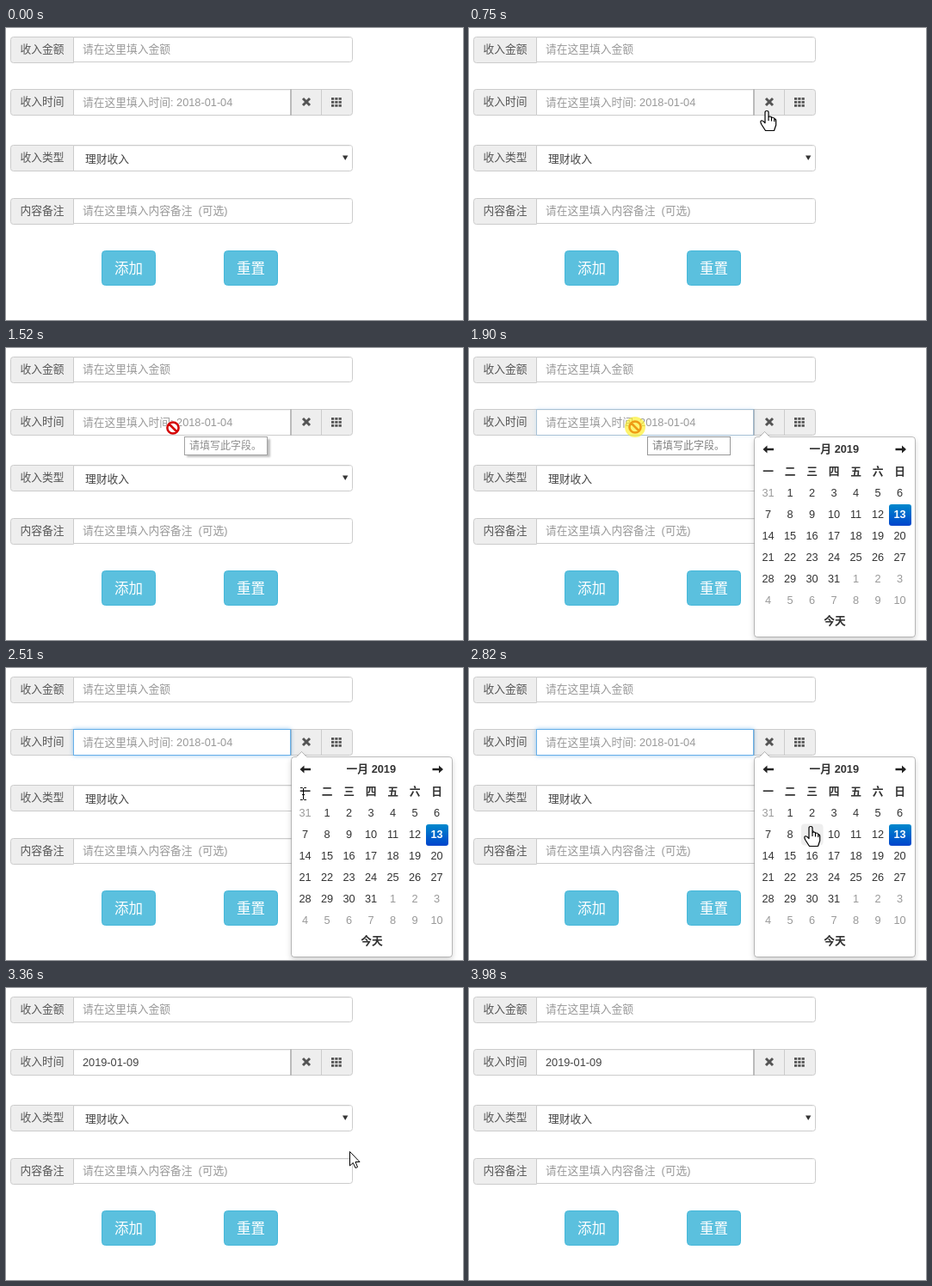
Recreate the animation shown at these times as an HTML page. Size 531 by 340 pixels, loop 4.53 s.

```html
<!DOCTYPE html>
<html lang="zh-CN">
<head>
<meta charset="utf-8">
<style>
  html, body { margin: 0; width: 100%; height: 100%; overflow: hidden; background: #fff; }
  svg { display: block; width: 531px; height: 340px; }
  text { font: 12.75px "Liberation Sans", "Noto Sans CJK SC", "Noto Sans CJK", sans-serif; white-space: pre; }
  .b { font-weight: bold; }
  .mid { text-anchor: middle; }
  #glow { filter: drop-shadow(0 0 2.5px rgba(102, 175, 233, .7)); }
  #panel { filter: drop-shadow(0 3px 3px rgba(0, 0, 0, .18)); }
  #shade { filter: blur(1px); }
</style>
</head>
<body>
<svg viewBox="0 0 531 340">
  <defs>
    <linearGradient id="blue" x2="0" y2="1">
      <stop stop-color="#08c"/><stop offset="1" stop-color="#04c"/>
    </linearGradient>
  </defs>
  <g id="form"></g>
  <rect id="glow" x="78.5" y="71.5" width="252" height="30" fill="#fff" stroke="#66afe9"/>
  <g id="words"></g>
  <g id="tip">
    <rect id="shade" x="210" y="106" width="97" height="21" fill="#888" opacity=".8"/>
    <rect x="207.5" y="103.5" width="96" height="21" fill="#fff" stroke="#767676"/>
    <text x="213" y="118" fill="#575757" style="font-size:12px">请填写此字段。</text>
  </g>
  <g id="calendar">
    <path id="panel" fill="#fff" stroke="#000" stroke-opacity=".25"
      d="M335 103.500h2.500l6-6 6 6H515q3.500 0 3.500 3.500V333q0 3.500-3.500 3.500H335q-3.500 0-3.500-3.500V107q0-3.500 3.500-3.500z"/>
    <rect id="hover" width="25.5" height="25" rx="4" fill="#eee"/>
    <rect x="488" y="182" width="26" height="25" rx="3" fill="url(#blue)"/>
    <path d="M341.500 118l5-4.500v3.200h7.500v2.600h-7.500v3.200zM508 118l-5-4.500v3.200h-7.500v2.600h7.500v3.200z" fill="#222"/>
    <g id="days"></g>
  </g>
  <g id="cursor" stroke="#000" fill="#fff">
    <path id="arrow" d="M.5.5V17L4.300 13.500 7 19.500 9.500 18.500 7 12.500H12z"/>
    <g id="ban">
      <circle r="8" stroke="none"/>
      <path d="M6.600 0A6.600 6.600 0 1 1-6.600 0 6.600 6.600 0 1 1 6.600 0M-4.500-4.500 4.500 4.500" stroke="#d40000" stroke-width="2.500"/>
    </g>
    <path id="beam" d="M-3-6.500h2.500l1 1 1-1H4M.5-6V7M-3 7.500h2.500l1-1 1 1H4M-1 1.500h3" fill="none"/>
    <path id="hand" stroke-width="1.200" stroke-linejoin="round"
      d="M-1 2.500Q-1 .5 1 .5T3 2.500V8Q3 7 4.800 7T6.500 9Q6.500 8 8 8T9.800 10Q11.700 9.500 11.700 12V17L9.500 23.500H-.5L-5 16.500Q-7 13-5.500 12T-1 14.500zM3 8v4M6.500 9v3.500M9.800 10v3"/>
  </g>
  <circle id="click" r="12" fill="#fcee20" opacity=".65"/>
</svg>
<script>
const LOOP = 4530;
const $ = id => document.getElementById(id);
const show = (id, on) => $(id).setAttribute("opacity", +on);
const text = (x, y, s, fill, cls = "", id = "") =>
  `<text x="${x}" y="${y}" fill="${fill}" class="${cls}" id="${id}">${s}</text>`;

function row(y, h = 30, right = 402.5, r = 3) {
  return `<path d="M78.500 ${y}h-70q-3 0-3 3v24q0 3 3 3h70z" fill="#eee" stroke="#ccc"/>
    <path d="M78.500 ${y}H${right - r}q${r} 0 ${r} ${r}v${h - 2 * r}q0 ${r}-${r} ${r}H78.500z" fill="#fff" stroke="#ccc"/>
    <path d="M79 ${y + 1}H${right - 1}" stroke="#f1f1f1"/>`;
}

function button(x, label) {
  return `<rect x="${x + .5}" y="259.500" width="62" height="40" rx="4" fill="#5bc0de" stroke="#46b8da"/>
    <text x="${x + 31.5}" y="285.500" class="mid" fill="#fff" style="font-size:16.500px">${label}</text>`;
}

let grid = "";
for (let i = 0; i < 9; i++)
  grid += `<rect x="${378 + i % 3 * 4.3}" y="${81 + (i / 3 | 0) * 4}" width="3.200" height="2.800" fill="#555"/>`;

$("form").innerHTML =
  `<rect x="320.500" y="71.500" width="82" height="30" rx="3" fill="#eee" stroke="#ccc"/>` +
  row(10.5, 29) + row(71.5, 30, 330.5, 0) + row(136.5) + row(198.5, 29) +
  `<path d="M331 71v31" stroke="#bbb" stroke-width="2"/><path d="M366.500 72v29" stroke="#ccc"/>
   <path d="M345 82l8 8m0-8l-8 8" stroke="#555" stroke-width="3"/>
   <path d="M391 148.500h6.400l-3.200 5.500z" fill="#333"/>` +
  grid + button(111, "添加") + button(253, "重置");

$("words").innerHTML =
  [["收入金额", 28.6], ["收入时间", 89.6], ["收入类型", 154.6], ["内容备注", 216.8]]
    .map(([s, y]) => text(16.5, y, s, "#555")).join("") +
  text(89, 28.6, "请在这里填入金额", "#999") +
  text(89, 90.7, "请在这里填入时间: 2018-01-04", "#999", "", "hint") +
  text(89, 90.7, "2019-01-09", "#444", "", "value") +
  text(92, 156.6, "理财收入", "#444") +
  text(89, 216.8, "请在这里填入内容备注  (可选)", "#999");

const colX = c => 347.5 + 25.5 * c;
let days = text(424.3, 122.4, "一月 2019", "#333", "b mid") + text(425, 322.4, "今天", "#333", "b mid");
[..."一二三四五六日"].forEach((s, c) => days += text(colX(c), 147.8, s, "#333", "b mid"));
for (let i = 0; i < 42; i++) {
  const day = (i + 30) % 31 + 1, today = i === 13;
  const fill = today ? "#fff" : i < 1 || i > 31 ? "#999" : "#333";
  days += text(colX(i % 7), 172.5 + 25 * (i / 7 | 0), day, fill, today ? "b mid" : "mid");
}
$("days").innerHTML = days;

// Pointer moves: first and last step time, steps, start, end, progress curve
const out = p => 1 - (1 - p) ** 2, linear = p => p;
const moves = [
  [590, 1060, 7, [510, 122], [213, 76], out],
  [1210, 1520, 5, [210, 84], [194, 93], out],
  [1750, 1820, 2, [194, 93], [193, 92], linear],
  [2350, 2510, 3, [244, 111], [345, 146], linear],
  [2590, 2820, 4, [368, 163], [396, 184], out],
  [2890, 2970, 2, [398, 187], [399, 190], linear],
  [3670, 3900, 4, [415, 214], [495, 330], linear],
];

function pointer(t) {
  const move = moves.filter(m => m[0] <= t).pop();
  if (!move || t >= 3980) return null;
  const [start, end, steps, from, to, ease] = move;
  const n = steps - 1, k = Math.min(n, Math.floor((t - start) / (end - start) * n + .05));
  return from.map((v, i) => v + (to[i] - v) * ease(k / n));
}

// Rises from 0 to 1 in n steps
const ramp = (t, start, n) => Math.max(0, Math.min(1, Math.floor((t - start) / 76 + 1) / n));

function shape(x, y, open) {
  if (open && x > 335 && x < 514 && y > 131 && y < 307) return y < 156.5 ? "beam" : "hand";
  if (y > 71 && y < 102 && x > 78 && x < 403) return x < 331 ? "ban" : "hand";
  return "arrow";
}

function draw() {
  const t = performance.now() % LOOP;
  const open = t >= 1900 && t < 3290, filled = t >= 3290;
  show("calendar", open);
  show("hint", !filled);
  show("value", filled);
  show("glow", ramp(t, 1890, 3) - ramp(t, 3280, 2));
  show("tip", ramp(t, 1370, 3) - ramp(t, 1890, 4));
  show("shade", t < 1820 ? .8 : 0);

  const at = pointer(t);
  show("cursor", at !== null);
  show("click", at && (t >= 1750 && t < 2050 || t >= 3200 && t < 3360) ? .65 : 0);
  if (at) {
    const [x, y] = at, kind = shape(x, y, open);
    for (const id of ["arrow", "ban", "beam", "hand"]) show(id, id === kind);
    $("cursor").setAttribute("transform", `translate(${Math.round(x)} ${Math.round(y)})`);
    $("click").setAttribute("transform", `translate(${x} ${y})`);
    show("hover", open && kind === "hand");
    $("hover").setAttribute("x", 335 + 25.5 * Math.floor((x - 335) / 25.5));
    $("hover").setAttribute("y", 156.5 + 25 * Math.floor((y - 156.5) / 25));
  }
  requestAnimationFrame(draw);
}
draw();
</script>
</body>
</html>
```
